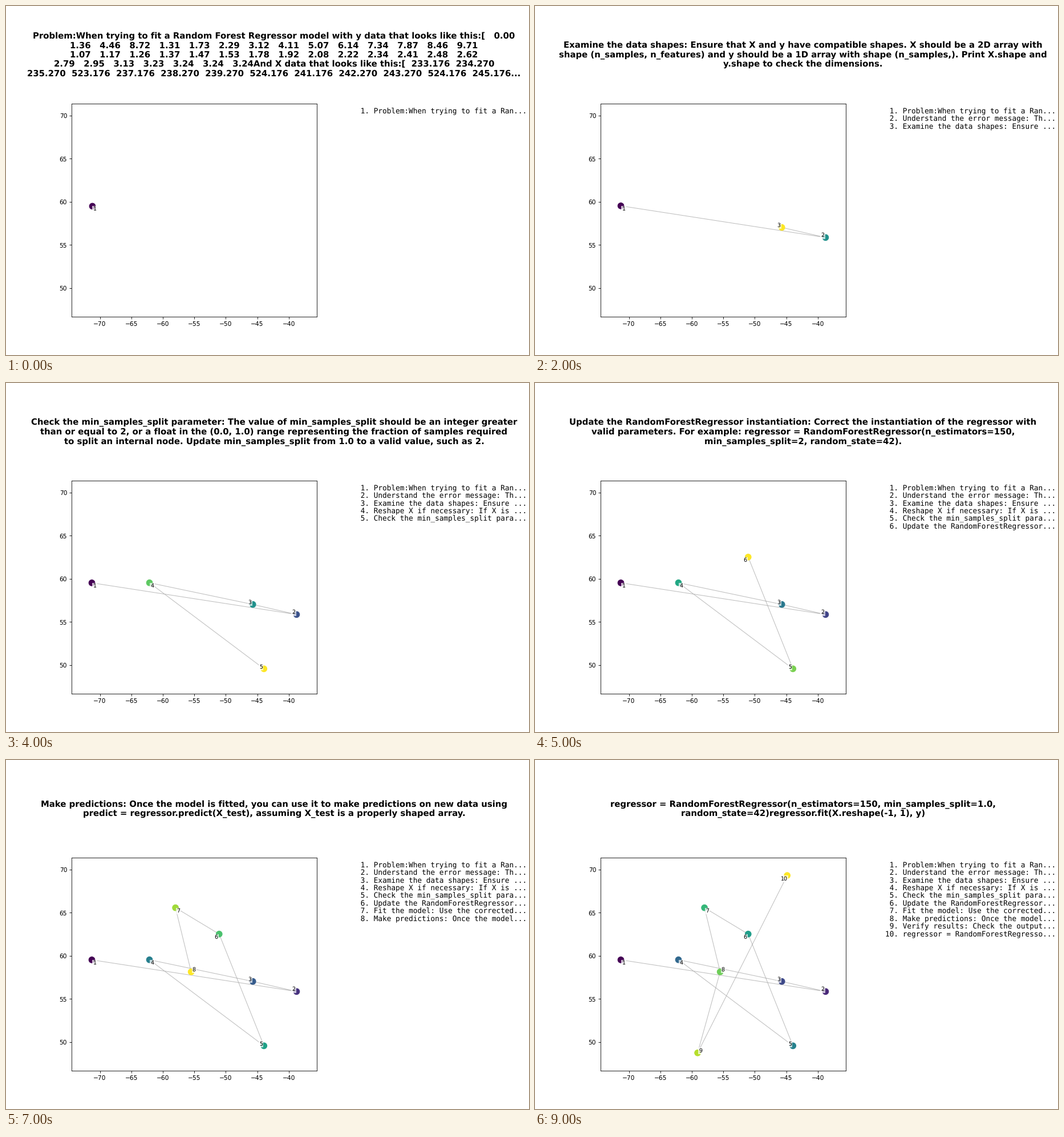
These frames come from a looping animation (917x611 px, 10 s). A matplotlib script:

```python
import numpy as np
import matplotlib.pyplot as plt
from matplotlib.animation import FuncAnimation

W, H = 917, 611
DPI = W / 12
plt.rcParams.update({"font.family": "DejaVu Sans", "text.hinting": "none"})

STEPS = [
    "Problem:When trying to fit a Random Forest Regressor model with y data that looks like this:[   0.00\n"
    "1.36   4.46   8.72   1.31   1.73   2.29   3.12   4.11   5.07   6.14   7.34   7.87   8.46   9.71\n"
    "1.07   1.17   1.26   1.37   1.47   1.53   1.78   1.92   2.08   2.22   2.34   2.41   2.48   2.62\n"
    "2.79   2.95   3.13   3.23   3.24   3.24   3.24And X data that looks like this:[  233.176  234.270\n"
    "235.270  523.176  237.176  238.270  239.270  524.176  241.176  242.270  243.270  524.176  245.176...",
    "Understand the error message: The error 'Number of labels=600 does not match number of samples=1'\n"
    "suggests that there's a mismatch between the number of samples in X and y. This is likely because\n"
    "the dimensions of X and y do not align properly for model fitting.",
    "Examine the data shapes: Ensure that X and y have compatible shapes. X should be a 2D array with\n"
    "shape (n_samples, n_features) and y should be a 1D array with shape (n_samples,). Print X.shape and\n"
    "y.shape to check the dimensions.",
    "Reshape X if necessary: If X is a 1D array with shape (n_samples,), reshape it to a 2D array with\n"
    "shape (n_samples, 1) using X = X.reshape(-1, 1).",
    "Check the min_samples_split parameter: The value of min_samples_split should be an integer greater\n"
    "than or equal to 2, or a float in the (0.0, 1.0) range representing the fraction of samples required\n"
    "to split an internal node. Update min_samples_split from 1.0 to a valid value, such as 2.",
    "Update the RandomForestRegressor instantiation: Correct the instantiation of the regressor with\n"
    "valid parameters. For example: regressor = RandomForestRegressor(n_estimators=150,\n"
    "min_samples_split=2, random_state=42).",
    "Fit the model: Use the corrected regressor to fit the model with regressor.fit(X, y), making\n"
    "sure that X and y have the same number of samples.",
    "Make predictions: Once the model is fitted, you can use it to make predictions on new data using\n"
    "predict = regressor.predict(X_test), assuming X_test is a properly shaped array.",
    "Verify results: Check the output to ensure the predictions match the expected shape and\n"
    "distribution of the original y data.",
    "regressor = RandomForestRegressor(n_estimators=150, min_samples_split=1.0,\n"
    "random_state=42)regressor.fit(X.reshape(-1, 1), y)",
]

# one key point per step
POINTS = np.array([
    (-71.27, 59.53), (-38.76, 55.86), (-45.71, 57.03), (-62.12, 59.54),
    (-43.94, 49.57), (-51.05, 62.52), (-57.99, 65.57), (-55.50, 58.14),
    (-59.08, 48.75), (-44.85, 69.31),
])
lo, hi = POINTS.min(axis=0), POINTS.max(axis=0)
pad = 0.1 * (hi - lo)
inward = np.sign((lo + hi) / 2 - POINTS)

fig = plt.figure(figsize=(W / DPI, H / DPI), dpi=DPI, facecolor="white")
ax = fig.add_axes([0.125, 0.11, 0.4697, 0.61])
side = fig.add_axes([0.66515, 0.11, 0.23485, 0.61])
side.axis("off")
ax.set_xlim(lo[0] - pad[0], hi[0] + pad[0])
ax.set_ylim(lo[1] - pad[1], hi[1] + pad[1])

title = fig.text(0.5125, 0.86, "", fontsize=14, fontweight="bold",
                 ha="center", va="center", linespacing=1.155)
path, = ax.plot([], [], color="gray", alpha=0.5, lw=1, zorder=1)
dots = ax.scatter([], [], s=100, zorder=2)


def add_label(i):
    """Number beside a point, on the side facing the middle of the plot."""
    dx, dy = inward[i] * (5, 4.7)
    return ax.annotate(
        str(i + 1), POINTS[i], xytext=(dx, dy - 1.1),
        textcoords="offset pixels", fontsize=9, ha="center", va="center",
        bbox=dict(facecolor="white", edgecolor="none", alpha=0.7, pad=1))


def add_row(i):
    head = STEPS[i].replace("\n", " ")[:32]
    return side.text(0.02, 0.981 - 0.036 * i, f"{i + 1:>2}. {head}...",
                     family="DejaVu Sans Mono", fontsize=12, va="top")


labels = [add_label(i) for i in range(len(STEPS))]
rows = [add_row(i) for i in range(len(STEPS))]


def draw(k):
    n = k + 1
    title.set_text(STEPS[k])
    path.set_data(*POINTS[:n].T)
    dots.set_offsets(POINTS[:n])
    dots.set_color(plt.cm.viridis(np.arange(n) / max(k, 1)))
    for i, (label, row) in enumerate(zip(labels, rows)):
        label.set_visible(i < n)
        row.set_visible(i < n)
    return [title, path, dots, *labels, *rows]


anim = FuncAnimation(fig, draw, frames=len(STEPS), interval=1000,
                     repeat=True, repeat_delay=0)
plt.show()
```
